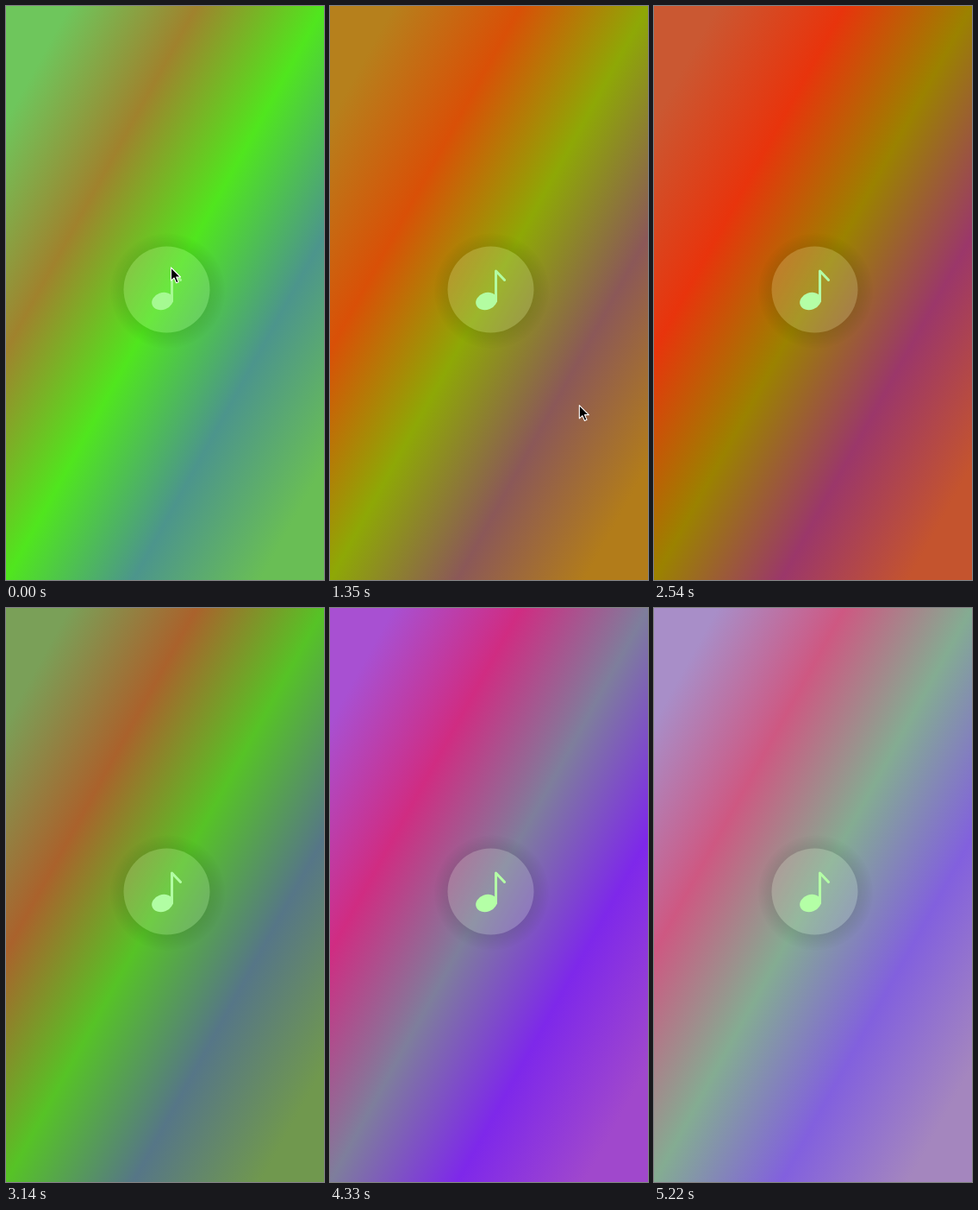
Write an HTML page that moves like this. It is 369 px wide and 665 px high and loops after 5.26 s.

```html
<!DOCTYPE html>
<html lang="en">
<head>
<meta charset="utf-8">
<title>Music button on a shifting gradient</title>
<style>
  html, body { margin: 0; width: 100%; height: 100%; overflow: hidden; }
  svg { display: block; width: 100%; height: 100%; }
</style>
</head>
<body>
<svg viewBox="0 0 369 665" preserveAspectRatio="none">
  <defs>
    <linearGradient id="sky" x1="0" y1="0" x2="1" y2="1">
      <stop offset=".1"/><stop offset=".3"/><stop offset=".5"/><stop offset=".7"/><stop offset=".9"/>
    </linearGradient>
    <radialGradient id="shade">
      <stop offset=".7" stop-opacity=".1"/>
      <stop offset=".85" stop-opacity=".055"/>
      <stop offset="1" stop-opacity="0"/>
    </radialGradient>
    <mask id="ring">
      <rect width="369" height="665" fill="#fff"/>
      <circle cx="186.5" cy="328.5" r="50"/>
    </mask>
  </defs>
  <rect width="369" height="665" fill="url(#sky)"/>
  <circle cx="187.5" cy="330" r="67" fill="url(#shade)" mask="url(#ring)"/>
  <circle cx="186.5" cy="328.5" r="50" fill="#d7f0cd" fill-opacity=".19"/>
  <g id="note" fill="#b4ffa6">
    <ellipse cx="181.5" cy="342" rx="12.6" ry="9.8" transform="rotate(-20 181.5 342)"/>
    <path d="M192.5 342V307L202.5 317.5" fill="none" stroke="#b4ffa6" stroke-width="3" stroke-linecap="round" stroke-linejoin="round"/>
  </g>
  <path id="cursor" d="M0 0V15.2L3.6 12L6.1 17.8L8.7 16.7L6.2 11H11Z" fill="#000" stroke="#fff" stroke-width="1.1" stroke-linejoin="round"/>
</svg>
<script>
const LOOP = 5260;
const stops = document.querySelectorAll('#sky stop');
const note = document.getElementById('note');
const cursor = document.getElementById('cursor');

// Corner, red, green, blue and far corner colours, then the note's opacity.
const theme = (hexes, opacity) => [
  ...hexes.split(' ').flatMap(h => [0, 2, 4].map(i => parseInt(h.slice(i, i + 2), 16))),
  opacity
];
const mix = (a, b, k) => a.map((v, i) => v + (b[i] - v) * k);

const meadow = theme('6ec65c a0822d 50e61e 4c958c 69be55', 0.8);
const ember  = theme('c93a38 ea1e0e 9e6a0c 9e1a6a c93a34', 1);
const lime   = theme('a2c600 c88200 7de600 789646 9bbe00', 0.93);
const rust   = theme('ca5832 e8340c 9b8200 9b376a c4542e', 1);
const moss   = theme('7aa058 aa622c 56c326 567687 70984e', 0.97);
const violet = theme('a850d2 d02c82 7e7e9c 7e28ea a048cc', 1);
const lilac  = theme('a88ec8 ce5882 84ac92 8260de a486be', 1);

const colours = [
  [0, meadow], [300, meadow],
  [750, ember], [900, ember],
  [1350, mix(ember, lime, 0.5)], [1500, mix(ember, lime, 0.5)],
  [1800, lime], [2090, lime],
  [2540, rust], [2690, rust],
  [3140, moss], [3290, moss],
  [3740, mix(moss, violet, 0.5)], [3890, mix(moss, violet, 0.5)],
  [4330, violet], [4480, violet],
  [4920, lilac], [LOOP, lilac]
];

const pointer = [
  [0, [191.5, 303]], [450, [192, 303]], [600, [210, 302]], [750, [233.5, 306]],
  [1050, [262, 368]], [1500, [303, 510]], [1800, [326.5, 590.5]],
  [2240, [343, 645]], [2540, [352, 690]], [LOOP, [352, 690]]
];

// The picture steps at these times and rests in between.
const ticks = [0, 150];
for (let t = 450; t <= 1800; t += 150) ticks.push(t);
ticks.push(1940, 2090, 2240, 2390, 2540);
for (const t of [2840, 3440, 4040, 4630]) ticks.push(t, t + 150, t === 2840 || t === 3440 ? t + 300 : t + 290);
ticks.push(5220);

function sample(keys, t) {
  const i = keys.findIndex(k => k[0] > t);
  const [t0, a] = keys[i - 1], [t1, b] = keys[i];
  return mix(a, b, (t - t0) / (t1 - t0));
}

function draw(ms) {
  const t = ticks.filter(x => x <= ms).pop();
  const c = sample(colours, t);
  stops.forEach((s, i) =>
    s.setAttribute('stop-color', `rgb(${c.slice(i * 3, i * 3 + 3).map(Math.round)})`));
  note.setAttribute('opacity', c[15]);
  cursor.setAttribute('transform', `translate(${sample(pointer, t)})`);
}

const start = performance.now();
function loop() {
  draw((performance.now() - start) % LOOP);
  requestAnimationFrame(loop);
}
loop();
</script>
</body>
</html>
```
